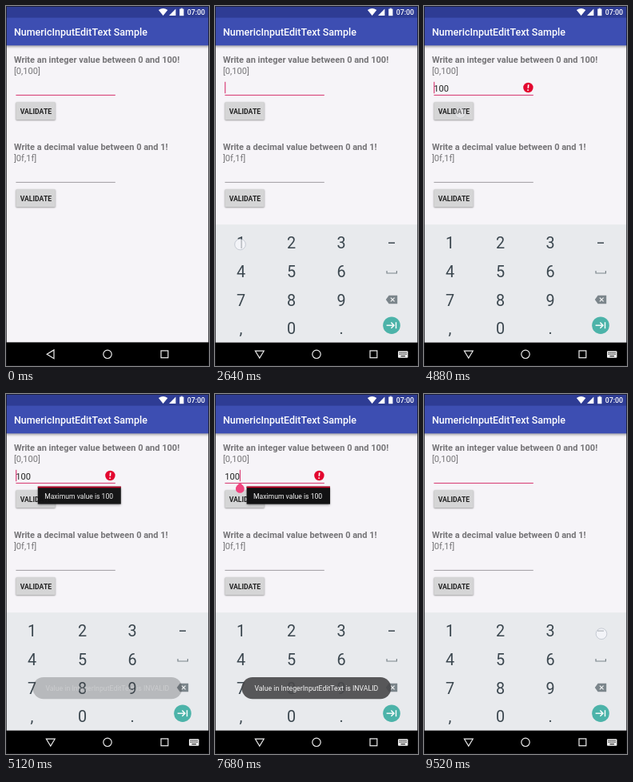
Animation of 254x450 px, one loop 9.56 s. Source, as an HTML page with a canvas:

```html
<!DOCTYPE html>
<html lang="en">
<head>
<meta charset="utf-8">
<title>Numeric input sample</title>
<style>
  html, body { margin: 0; width: 100%; height: 100%; overflow: hidden; background: #000; }
  canvas { display: block; width: 254px; height: 450px; }
</style>
</head>
<body>
<canvas id="stage"></canvas>
<script>
const W = 254, H = 450, LOOP = 9560;
const canvas = document.getElementById('stage');
const scale = window.devicePixelRatio || 1;
canvas.width = W * scale;
canvas.height = H * scale;
const c = canvas.getContext('2d');

const PINK = '#d9447a';
const KEY_X = [32.5, 95.5, 158, 221];
const KEY_Y = [296, 331.7, 367.5, 403];
const CHAR = 6.24, TEXT_X = 12.6;

// Field contents: start time, text, caret index
const EDITS = [
  [0, '', 0], [3000, '1', 1], [3300, '10', 2], [3540, '100', 3], [3780, '1000', 4],
  [4640, '100', 0], [7200, '100', 3], [8440, '10', 2], [8760, '1', 1], [9000, '', 0]
];
const CARET_ON = [
  [200, 700], [2160, 4080], [4600, 5400], [6280, 7700], [8040, 9140]
];
// Touches: from, to, x, y
const TOUCHES = [
  [680, 1300, 25.5, 107.5], [2640, 3100, 31.5, 298], [3140, 3900, 95, 404],
  [4240, 4960, 45.5, 133.5], [6840, 7480, 74.5, 99.5],
  [8360, 9140, 228, 374], [9320, LOOP, 222, 299.7]
];
// Key presses: from, to, column, row
const PRESSES = [
  [2920, 3060, 0, 0], [3240, 3340, 1, 3], [3480, 3580, 1, 3], [3720, 3820, 1, 3],
  [8400, 8600, 3, 2], [8720, 8820, 3, 2], [8960, 9060, 3, 2]
];

const within = (t, from, to) => t >= from && t < to;
const ramp = (t, from, to) => Math.min(1, Math.max(0, (t - from) / (to - from)));
const easeOut = p => 1 - (1 - p) * (1 - p);

function rect(x, y, w, h, color) {
  c.fillStyle = color;
  c.fillRect(x, y, w, h);
}

function round(x, y, w, h, r, color) {
  c.fillStyle = color;
  c.beginPath();
  c.roundRect(x, y, w, h, r);
  c.fill();
}

function disc(x, y, r, color) {
  c.fillStyle = color;
  c.beginPath();
  c.arc(x, y, r, 0, Math.PI * 2);
  c.fill();
}

function path(points, closed) {
  c.beginPath();
  points.forEach(([x, y]) => c.lineTo(x, y));
  if (closed) c.closePath();
}

function shape(points, color) {
  path(points, true);
  c.fillStyle = color;
  c.fill();
}

function line(points, color, width, closed) {
  path(points, closed);
  c.strokeStyle = color;
  c.lineWidth = width;
  c.stroke();
}

function text(str, x, y, size, color, weight = 400, align = 'left') {
  c.font = `${weight} ${size}px Roboto, sans-serif`;
  c.textAlign = align;
  c.fillStyle = color;
  c.fillText(str, x, y);
}

function withShadow(color, blur, dy, draw) {
  c.save();
  c.shadowColor = color;
  c.shadowBlur = blur * scale;
  c.shadowOffsetY = dy * scale;
  draw();
  c.restore();
}

function drawBars() {
  withShadow('rgba(0,0,0,.35)', 3, 1.2, () => rect(0, 14, W, 35.3, '#3d4eb2'));
  rect(0, 0, W, 14.6, '#2e3c94');
  text('NumericInputEditText Sample', 9.9, 36.7, 12.5, '#fff', 500);

  c.fillStyle = '#fff';
  c.beginPath();
  c.moveTo(196.6, 12);
  c.lineTo(190.9, 5);
  c.quadraticCurveTo(196.6, 1, 202.3, 5);
  c.fill();
  shape([[204, 12], [212.4, 12], [212.4, 3.4]], '#fff');
  rect(217.2, 3.6, 5.2, 8.6, '#fff');
  rect(218.7, 2.7, 2.2, 1, '#fff');
  text('07:00', 249, 11.4, 8.8, '#fff', 500, 'right');
}

function drawButton(y, pressed) {
  withShadow('rgba(0,0,0,.4)', pressed ? 4 : 2, pressed ? 1.4 : 0.8,
    () => round(12.4, y, 49.4, 22.3, 1.3, pressed ? '#c6c7c8' : '#d5d5d6'));
  text('VALIDATE', 37.4, y + 14.6, 8.65, '#222', 700, 'center');
}

function drawForm(t) {
  text('Write an integer value between 0 and 100!', 9.9, 70.8, 11, '#757477', 700);
  text('[0,100]', 9.9, 85.4, 11.12, '#757477');
  text('Write a decimal value between 0 and 1!', 9.9, 179.8, 11, '#757477', 700);
  text(']0f,1f]', 9.9, 194.3, 11.12, '#757477');
  rect(12.4, 110.9, 124.4, 1.1, PINK);
  rect(12.4, 219.9, 124.4, 0.8, '#89878b');
  drawButton(120, within(t, 4560, 4760));
  drawButton(229, false);

  const [, value, index] = EDITS.filter(e => e[0] <= t).pop();
  text(value, TEXT_X - 0.3, 106.6, 11.12, '#222');
  if (CARET_ON.some(([a, b]) => within(t, a, b))) {
    rect(TEXT_X + index * CHAR - 0.5, 94.8, 1.2, 14.4, PINK);
  }
  if (within(t, 4640, 8440)) drawError();
}

function drawError() {
  disc(130.4, 102, 6.2, '#e3062f');
  line([[130.7, 98.2], [130.3, 102.8]], '#fff', 1.7);
  disc(130.1, 105.1, 0.95, '#fff');
}

function drawHandle(t) {
  if (!within(t, 7200, 8590)) return;
  const x = TEXT_X + 3 * CHAR, y = 118.4;
  c.save();
  c.globalAlpha = 1 - ramp(t, 8440, 8590);
  c.translate(x, y);
  c.rotate(Math.PI / 4);
  round(-5.4, -5.4, 10.8, 10.8, [0, 5.4, 5.4, 5.4], '#f0447f');
  c.restore();
}

function drawPopup(t) {
  const show = easeOut(ramp(t, 4960, 5160)), hide = ramp(t, 8440, 8564);
  const alpha = show * (1 - hide);
  if (!alpha) return;
  const size = 0.9 + 0.1 * Math.min(show, 1 - hide);
  c.save();
  c.globalAlpha = alpha;
  c.translate(92, 126.5);
  c.scale(size, size);
  c.translate(-92, -126.5);
  withShadow('rgba(0,0,0,.45)', 3, 1, () => rect(39.6, 115.6, 104.4, 22, '#121213'));
  rect(39.6, 115.6, 104.4, 1.6, '#d3042c');
  text('Maximum value is 100', 48, 131, 8.65, '#f5f5f5');
  c.restore();
}

function drawBackspace() {
  shape([[213.8, 367], [217.6, 361.8], [228.2, 361.8], [228.2, 372.2], [217.6, 372.2]], '#7b858b');
  line([[219.8, 364.6], [224.6, 369.4]], '#f2f3f4', 1.2);
  line([[224.6, 364.6], [219.8, 369.4]], '#f2f3f4', 1.2);
}

function drawEnter() {
  disc(221, 399.2, 10.8, '#4cb3a9');
  line([[214.6, 399.2], [223.6, 399.2]], '#fff', 1.4);
  line([[220.4, 395.6], [224, 399.2], [220.4, 402.8]], '#fff', 1.4);
  line([[226.5, 395.2], [226.5, 403.2]], '#fff', 1.4);
}

// Slides up over the navigation bar while fading in
function drawKeyboard(t) {
  const shown = easeOut(ramp(t, 1280, 1500));
  if (!shown) return;
  c.save();
  c.globalAlpha = easeOut(shown);
  c.translate(0, (1 - shown) * 14.7);
  rect(0, 273.2, W, 147.2, '#e8eaed');
  for (const [a, b, col, row] of PRESSES) {
    if (within(t, a, b)) rect(1.6 + col * 62.7, 278 + row * 35.6, 62.7, 35.6, '#dcdfe5');
  }
  ['123', '456', '789', ',0.'].forEach((keys, row) => {
    [...keys].forEach((key, col) =>
      text(key, KEY_X[col], KEY_Y[row] + 7, 19.8, '#3b474f', 400, 'center'));
  });
  rect(217, 295.4, 8, 1.5, '#3b474f');
  line([[215, 331], [215, 334], [227.4, 334], [227.4, 331]], '#7b858b', 1.2);
  drawBackspace();
  drawEnter();
  c.restore();
}

function drawNav(t) {
  const open = t >= 1240;
  rect(0, 420.4, W, 30, '#000');
  line(open ? [[50.4, 431.2], [61.2, 431.2], [55.8, 440]]
            : [[60, 429.9], [60, 440.7], [51.2, 435.3]], '#eee', 1.2, true);
  c.beginPath();
  c.arc(127, 435.3, 5.2, 0, Math.PI * 2);
  c.stroke();
  c.strokeRect(194, 430.9, 8.8, 8.8);
  if (!open) return;
  round(229, 431.3, 12.4, 8.4, 1, '#eee');
  for (let row = 0; row < 2; row++) {
    for (let col = 0; col < 5; col++) {
      rect(230.5 + col * 2, 432.7 + row * 2, 1.2, 1.2, '#222');
    }
  }
  rect(232.5, 437.1, 5.4, 1.1, '#222');
}

function drawToast(t) {
  const alpha = ramp(t, 5000, 5360) * (1 - ramp(t, 8360, 8880));
  if (!alpha) return;
  c.save();
  c.globalAlpha = alpha;
  round(33.4, 354, 187, 27.2, 13.6, 'rgba(72,72,74,.9)');
  text('Value in IntegerInputEditText is INVALID', 126.9, 370.8, 8.75, '#f4f4f4', 400, 'center');
  c.restore();
}

function drawTouches(t) {
  for (const [from, to, x, y] of TOUCHES) {
    if (!within(t, from, to)) continue;
    c.save();
    c.globalAlpha = to === LOOP ? 1 : 1 - ramp(t, to - 160, to);
    disc(x, y, 6.8, 'rgba(248,248,252,.7)');
    c.strokeStyle = 'rgba(115,125,145,.4)';
    c.lineWidth = 0.8;
    c.stroke();
    c.restore();
  }
}

function draw(t) {
  c.setTransform(scale, 0, 0, scale, 0, 0);
  rect(0, 0, W, H, '#f6f4f8');
  drawForm(t);
  drawBars();
  drawHandle(t);
  drawPopup(t);
  drawNav(t);
  drawKeyboard(t);
  drawToast(t);
  drawTouches(t);
  c.strokeStyle = 'rgba(20,20,26,.75)';
  c.lineWidth = 1;
  c.strokeRect(0.5, 0.5, W - 1, H - 1);
}

const start = performance.now();
function tick() {
  draw((performance.now() - start) % LOOP);
  requestAnimationFrame(tick);
}
tick();
</script>
</body>
</html>
```
